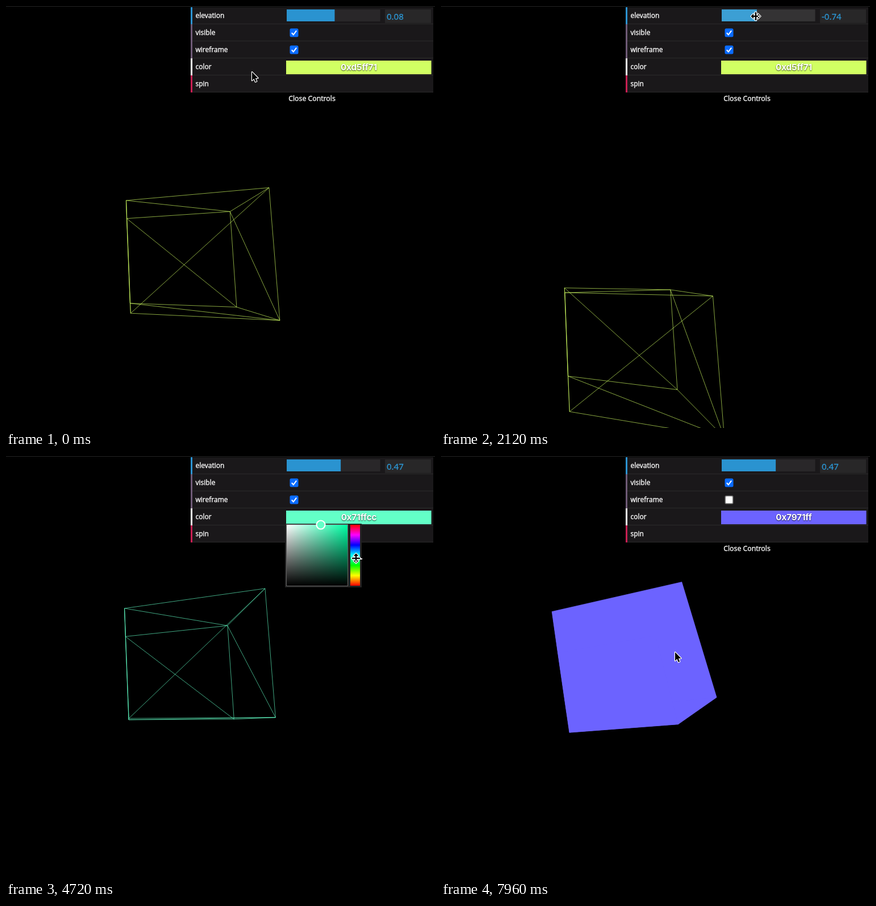
Recreate the animation shown at these times as an HTML page with a canvas. Size 755 by 742 pixels, loop 8 s.

```html
<!DOCTYPE html>
<html lang="en">
<head>
<meta charset="utf-8">
<title>Cube with debug panel</title>
<style>
  html, body { margin: 0; width: 100%; height: 100%; overflow: hidden; background: #000; }
  canvas { display: block; }
</style>
</head>
<body>
<canvas id="stage" width="755" height="742"></canvas>
<script>
const ctx = document.getElementById('stage').getContext('2d');
const LOOP = 8000;
const UI_FONT = '"Open Sans", "Noto Sans", sans-serif';
const RAD = Math.PI / 180;

// Phases as [start, end] in ms
const SPIN = [448, 1448], SLIDE = [1300, 2640], PICKER = [2760, 5850];
const HUE_DRAG = [4280, 5400], PRESS = [6440, 6560], ORBIT = [7250, 7960];

const linear = k => k;
const smooth = k => k * k * (3 - 2 * k);
const easeOut = k => 1 - (1 - k) ** 2;
const within = (t, [from, to]) => t >= from && t < to;
const progress = (t, [from, to]) => Math.min(1, Math.max(0, (t - from) / (to - from)));
const mix = (a, b, k) => a + (b - a) * k;

// Keys are [ms, value, ...]
function track(keys, t, column = 1, ease = smooth) {
  const next = keys.findIndex(key => key[0] > t);
  if (next < 1) return keys.at(next)[column];
  const a = keys[next - 1], b = keys[next];
  return mix(a[column], b[column], ease(progress(t, [a[0], b[0]])));
}

const elevationAt = t => track([[1300, .08], [2040, -.815], [2600, .47]], t);
const hueAt = t => track([[4280, 77.75], [4720, 158.45], [5400, 243.4]], t, 1, linear);
const sliderX = value => 494 + (value + 3) / 6 * 164.5;
const hueY = hue => 228 - 107 * hue / 360;

const POINTER = [
  [0, 433, 116], [480, 418, 133], [920, 533, 22], [1300, 576, 18], [2640, 587, 18], [3320, 621, 154],
  [4280, 616, 204], [5500, 616, 156], [6400, 507, 74], [6600, 507, 74], [7250, 409, 375], [7960, 412, 345]
];

function pointerAt(t) {
  return [
    within(t, SLIDE) ? sliderX(elevationAt(t)) - 2 : track(POINTER, t, 1),
    within(t, HUE_DRAG) ? hueY(hueAt(t)) - 1 : track(POINTER, t, 2)
  ];
}

function hueChannels(hue, min) {
  return [5, 3, 1].map(n => {
    const k = (n + hue / 60) % 6;
    return Math.round(255 - (255 - min) * Math.max(0, Math.min(k, 4 - k, 1)));
  });
}
const rgb = channels => `rgb(${channels})`;
const hex = channels => '0x' + channels.map(c => c.toString(16).padStart(2, '0')).join('');

function rect(x, y, w, h, fill, radius = 0) {
  ctx.beginPath();
  ctx.roundRect(x, y, w, h, radius);
  ctx.fillStyle = fill;
  ctx.fill();
}

function text(string, x, y, font, color, align = 'left') {
  ctx.font = font;
  ctx.fillStyle = ctx.strokeStyle = color;
  ctx.textAlign = align;
  ctx.fillText(string, x, y);
}

// Regular weight thickened slightly, between regular and semibold
function label(string, x, y, size, color, align) {
  text(string, x, y, `${size}px ${UI_FONT}`, color, align);
  ctx.lineWidth = .35;
  ctx.strokeText(string, x, y);
}

function line(points) {
  points.forEach(([x, y], i) => i ? ctx.lineTo(x, y) : ctx.moveTo(x, y));
}

// Cube vertex bits: right 1, top 2, back 4
const VERTICES = [...Array(8).keys()];
const AXES = [1, 2, 4];
const FACES = AXES.flatMap(axis => {
  const [p, q] = AXES.filter(other => other !== axis);
  return [0, axis].map(side => [side, side | p, side | p | q, side | q]);
});
const DIAGONALS = [[0, 3], [5, 6], [2, 7], [1, 4], [1, 7], [2, 4]];
const EDGES = VERTICES.flatMap(v => AXES.filter(bit => !(v & bit)).map(bit => [v, v | bit])).concat(DIAGONALS);

const CAMERA = { focal: 542, x: -32, y: 423.4, distance: 2.92 };
const CUBE = { x: 1.908, y: -.1773, z: .066, yaw: 24.45 };

function rotate(x, z, angle) {
  return [x * Math.cos(angle) + z * Math.sin(angle), z * Math.cos(angle) - x * Math.sin(angle)];
}

function projectCube(t) {
  const orbit = progress(t, ORBIT);
  const pitch = mix(5, 17.6, orbit) * RAD;
  const turn = mix(0, 1.17, orbit) * RAD;
  const angle = CUBE.yaw * RAD + turn - 2 * Math.PI * easeOut(progress(t, SPIN));
  const sin = Math.sin(pitch), cos = Math.cos(pitch);
  const [midX, midZ] = rotate(CUBE.x, CUBE.z, turn);
  return VERTICES.map(v => {
    const [right, top, back] = AXES.map(bit => v & bit ? .5 : -.5);
    const [dx, dz] = rotate(right, back, angle);
    const x = midX + dx;
    const y = CUBE.y + elevationAt(t) + CAMERA.distance * sin + top;
    const z = midZ + CAMERA.distance * cos + dz;
    const scale = CAMERA.focal / (y * sin + z * cos);
    return [CAMERA.x + scale * x, CAMERA.y - scale * (y * cos - z * sin)];
  });
}

function drawCube(t, color) {
  const points = projectCube(t);
  const solid = t >= PRESS[1];
  ctx.strokeStyle = ctx.fillStyle = color;
  ctx.lineWidth = solid ? .5 : 1;
  ctx.globalAlpha = solid ? 1 : .65;
  ctx.beginPath();
  if (!solid) {
    EDGES.forEach(edge => line(edge.map(i => points[i])));
    ctx.stroke();
  } else {
    for (const face of FACES) {
      ctx.beginPath();
      line(face.map(i => points[i]));
      ctx.fill();
      ctx.stroke();
    }
  }
  ctx.globalAlpha = 1;
}

function drawCheckbox(y, checked, pressed) {
  if (!checked) {
    rect(499.5, y, 15, 15, '#767676', 2.5);
    rect(501, y + 1.5, 12, 12, '#fff', 1.5);
    return;
  }
  rect(499.5, y, 15, 15, pressed ? '#0a4cc4' : '#0a6cff', 2.5);
  ctx.beginPath();
  line([[502.8, y + 7.8], [505.8, y + 11], [511.2, y + 3.8]]);
  ctx.strokeStyle = '#fff';
  ctx.lineWidth = 2;
  ctx.stroke();
}

const ROWS = [
  { name: 'elevation', accent: '#2b93d1' },
  { name: 'visible', accent: '#6f5a76', hover: true },
  { name: 'wireframe', accent: '#6f5a76', hover: true },
  { name: 'color', accent: '#fff' },
  { name: 'spin', accent: '#c81f52', hover: true }
];

function drawPanel(t, color, code, [pointerX, pointerY]) {
  rect(0, 0, 755, 1, '#242424');
  ROWS.forEach((row, i) => {
    const top = 2 + i * 30;
    const hovered = row.hover && pointerX > 325 && pointerY >= top && pointerY < top + 30;
    rect(325, top, 427, 29, hovered ? '#111011' : '#1a181a');
    rect(325, top + 29, 427, 1, '#2b2a2b');
    rect(325, top, 3, 30, row.accent);
    label(row.name, 333.5, top + 19, 12, '#fff');
  });

  const value = elevationAt(t);
  const active = within(t, SLIDE);
  rect(494, 6, 164.5, 21, active ? '#343334' : '#292729');
  rect(494, 6, sliderX(value) - 494, 21, active ? '#3c9fd4' : '#2a93d0');
  rect(667, 6, 81, 24, '#282728');
  label(value.toFixed(2), 670, 24, 15, '#2c98d6');

  drawCheckbox(39.5, true, false);
  drawCheckbox(69.5, t < PRESS[1], within(t, PRESS));

  rect(493, 96, 255.5, 24, color);
  ctx.save();
  ctx.shadowColor = 'rgba(0,0,0,.75)';
  ctx.shadowBlur = 2;
  ctx.shadowOffsetY = 1;
  text(code, 621, 113, 'bold 15px Inter, sans-serif', '#fff', 'center');
  ctx.restore();

  label('Close Controls', 538.5, 167, 12.3, '#fff', 'center');
}

function gradient(x0, y0, x1, y1, colors) {
  const g = ctx.createLinearGradient(x0, y0, x1, y1);
  colors.forEach((c, i) => g.addColorStop(i / (colors.length - 1), c));
  return g;
}

function drawPicker(hue, color) {
  const spectrum = [...Array(7).keys()].map(i => `hsl(${360 - i * 60} 100% 50%)`);
  rect(491, 119, 135, 112, '#222');
  rect(493, 120, 109, 109, '#666');
  rect(494, 121, 107, 107, gradient(494, 0, 601, 0, ['#fff', rgb(hueChannels(hue, 0))]));
  rect(494, 121, 107, 107, gradient(0, 121, 0, 228, ['rgba(0,0,0,0)', '#000']));
  rect(606, 121, 17, 107, gradient(0, 121, 0, 228, spectrum));
  rect(622, hueY(hue) - 1, 5, 2, '#fff');
  ctx.beginPath();
  ctx.arc(554, 121, 7.5, 0, 7);
  ctx.fillStyle = color;
  ctx.fill();
  ctx.strokeStyle = '#fff';
  ctx.lineWidth = 2.2;
  ctx.stroke();
}

// Pointer shapes, each centred on its hot spot
function arrowPath() {
  line([[0, 0], [0, 15], [3.4, 11.8], [5.9, 17.4], [8.2, 16.4], [5.9, 11], [10.5, 10.7]]);
  ctx.closePath();
}

function resizePath() {
  ctx.rect(-7, -1.2, 14, 2.4);
  ctx.rect(-1.2, -7, 2.4, 14);
  for (const side of [-1, 1]) {
    line([[side * 8.5, 0], [side * 4, -4.5], [side * 4, 4.5]]);
    ctx.closePath();
  }
}

function handPath() {
  ctx.roundRect(-1.2, 0, 3, 12, 1.5);
  for (let finger = 0; finger < 3; finger++) ctx.roundRect(1.8 + finger * 2.8, 5.5 + finger * .7, 2.8, 7, 1.4);
  ctx.roundRect(-1.2, 8.5, 11.2, 7.5, 2);
  ctx.roundRect(-4.5, 7.5, 5, 4, 2);
}

function drawPointer(t, [x, y]) {
  const vertical = within(t, [3200, 5700]);
  const resizing = vertical || within(t, SLIDE);
  const pointing = within(t, [6250, 6720]) || (x > 493 && y > 95 && y < 120);
  ctx.save();
  ctx.translate(x, y);
  if (vertical) ctx.rotate(Math.PI / 2);
  ctx.beginPath();
  (resizing ? resizePath : pointing ? handPath : arrowPath)();
  const white = pointing && !resizing;
  ctx.strokeStyle = white ? '#000' : '#fff';
  ctx.fillStyle = white ? '#fff' : '#000';
  ctx.lineWidth = white ? 1.5 : 2.4;
  ctx.lineJoin = 'round';
  ctx.stroke();
  ctx.fill();
  ctx.restore();
}

function draw(t) {
  const hue = hueAt(t);
  const color = rgb(hueChannels(hue, 99));
  const pointer = pointerAt(t);
  rect(0, 0, 755, 742, '#000');
  drawCube(t, color);
  drawPanel(t, color, hex(hueChannels(hue, 113)), pointer);
  if (within(t, PICKER)) drawPicker(hue, color);
  drawPointer(t, pointer);
}

function frame() {
  draw(performance.now() % LOOP);
  requestAnimationFrame(frame);
}
frame();
</script>
</body>
</html>
```
